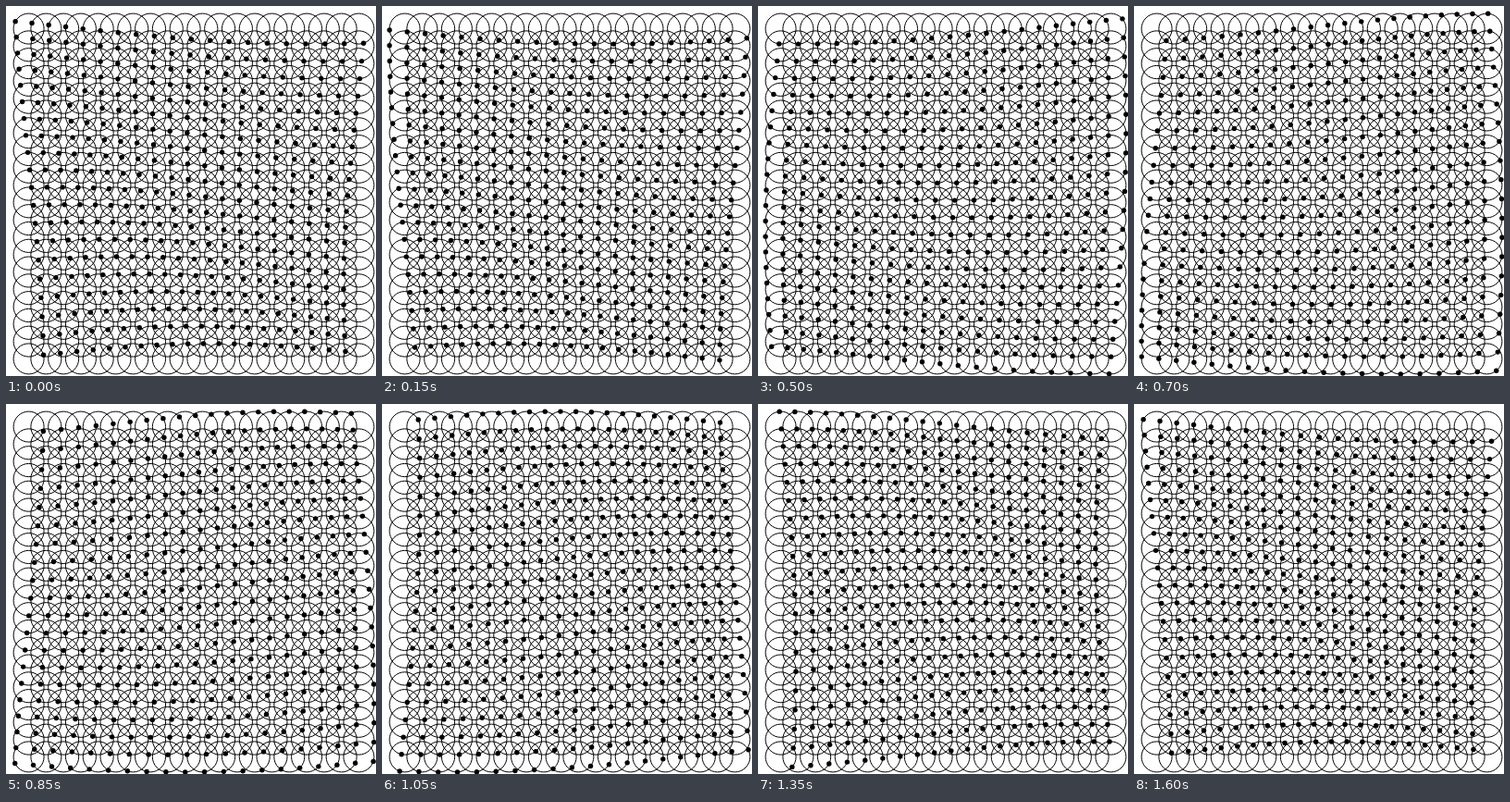
Write an HTML page with a canvas that moves like this. It is 400x400 px and loops after 1650 ms.

```html
<!DOCTYPE html>
<html lang="en">
<head>
<meta charset="utf-8">
<title>Orbiting dots</title>
<style>
  html, body { margin: 0; width: 100%; height: 100%; overflow: hidden; background: #fff; }
  canvas { display: block; }
</style>
</head>
<body>
<canvas id="stage" width="400" height="400"></canvas>
<script>
const ctx = document.getElementById('stage').getContext('2d');
const TAU = Math.PI * 2;
const COUNT = 20;
const SPACING = 18.78;
const START = 203 - SPACING * (COUNT - 1) / 2;
const ORBIT = 16.5;
const DOT = 2.7;
const LOOP = 1650;
const STEP = 50;
const STEPS_PER_TURN = 32;

function eachCell(draw) {
  for (let row = 0; row < COUNT; row++) {
    for (let col = 0; col < COUNT; col++) {
      draw(START + col * SPACING, START + row * SPACING, col, row);
    }
  }
}

function circle(x, y, radius) {
  ctx.beginPath();
  ctx.arc(x, y, radius, 0, TAU);
}

function render(time) {
  const step = Math.floor((time % LOOP) / STEP);
  const turn = step / STEPS_PER_TURN * TAU;

  ctx.fillStyle = '#fff';
  ctx.fillRect(0, 0, 400, 400);

  ctx.strokeStyle = ctx.fillStyle = '#000';
  ctx.lineWidth = 1;
  eachCell((x, y) => {
    circle(x, y, ORBIT);
    ctx.stroke();
  });

  // The phase grows along the diagonal from bottom left to top right.
  eachCell((x, y, col, row) => {
    const angle = turn + (col + 1 + COUNT - row) * TAU / 50;
    circle(x + ORBIT * Math.cos(angle), y - ORBIT * Math.sin(angle), DOT);
    ctx.fill();
  });
}

const origin = performance.now();
function tick() {
  render(performance.now() - origin);
  requestAnimationFrame(tick);
}
tick();
</script>
</body>
</html>
```
